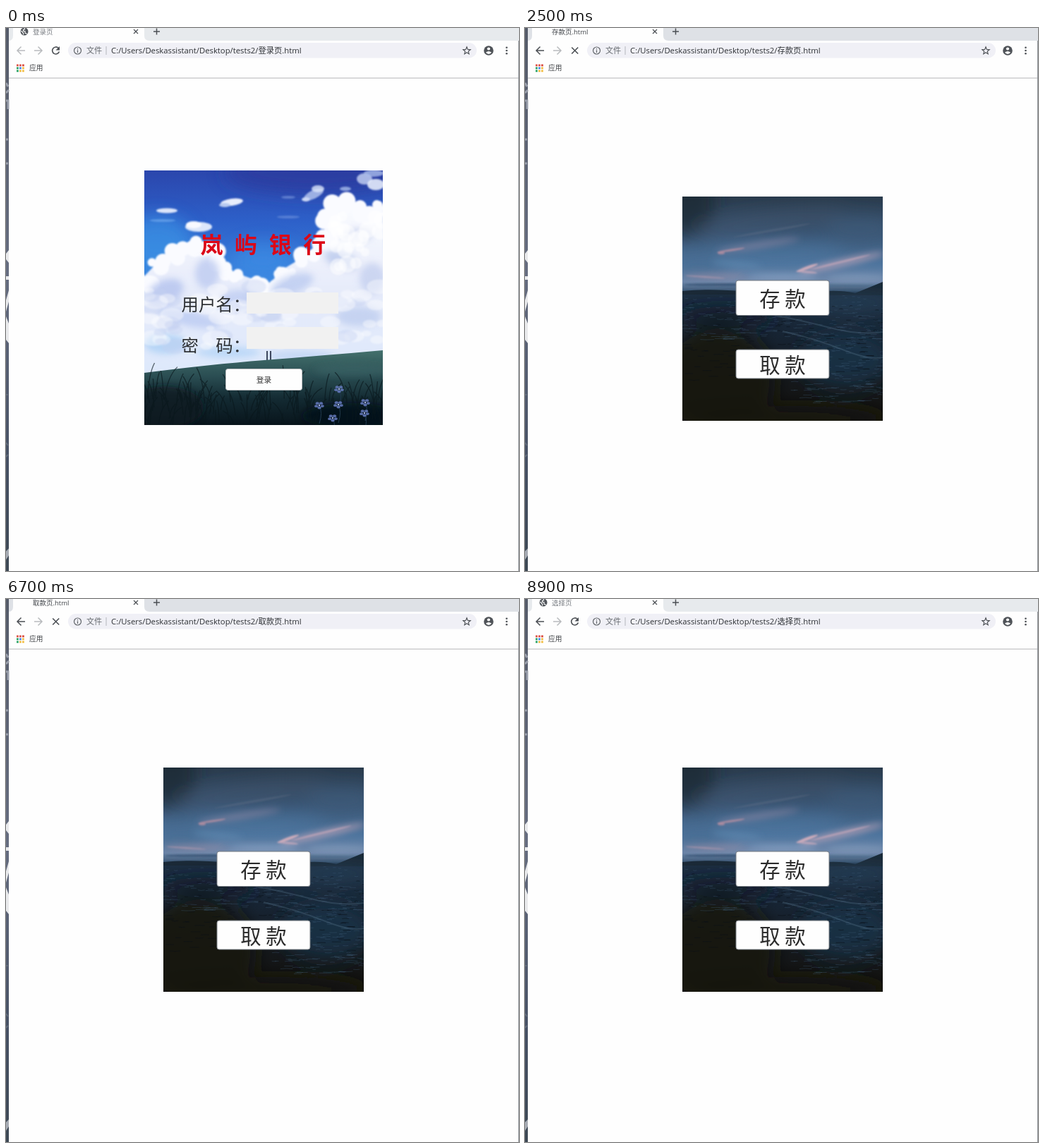
Write an HTML page that moves like this. It is 727x770 px and loops after 9 s.

```html
<!DOCTYPE html>
<html lang="zh-CN">
<head>
<meta charset="utf-8">
<title>Bank pages</title>
<style>
html, body { margin: 0; width: 100%; height: 100%; overflow: hidden; background: #fefefe; }
svg { display: block; }
text { font-family: "Open Sans", "Noto Sans CJK SC", "Noto Sans CJK", sans-serif; white-space: pre; }
.cjk { font-family: "Noto Sans CJK SC", "Noto Sans CJK", sans-serif; }
.page { visibility: hidden; }
</style>
</head>
<body>
<svg id="stage" width="727" height="770" viewBox="0 0 727 770">
  <defs>
    <linearGradient id="edge" x2="0" y2="1">
      <stop offset="0" stop-color="#555b69"/><stop offset=".45" stop-color="#666d80"/>
      <stop offset=".8" stop-color="#465063"/><stop offset="1" stop-color="#3d4854"/>
    </linearGradient>
    <linearGradient id="summer" x2="0" y2="1">
      <stop offset="0" stop-color="#2b46ac"/><stop offset=".2" stop-color="#2d60c9"/>
      <stop offset=".45" stop-color="#3d8ae2"/><stop offset="1" stop-color="#86b6ee"/>
    </linearGradient>
    <linearGradient id="cloud" x2="0" y2="1">
      <stop offset="0" stop-color="#fbfcff"/><stop offset=".5" stop-color="#e6ebfa"/>
      <stop offset="1" stop-color="#dde8fb"/>
    </linearGradient>
    <linearGradient id="hill" x2="0" y2="1">
      <stop offset="0" stop-color="#43706c"/><stop offset=".35" stop-color="#2a4d52"/>
      <stop offset=".65" stop-color="#132a32"/><stop offset="1" stop-color="#08141b"/>
    </linearGradient>
    <linearGradient id="dusk" x2="0" y2="1">
      <stop offset="0" stop-color="#2a3b4c"/><stop offset=".16" stop-color="#385473"/>
      <stop offset=".3" stop-color="#4d749d"/><stop offset=".38" stop-color="#7189ac"/>
      <stop offset=".42" stop-color="#3f5a78"/><stop offset=".435" stop-color="#1d3044"/>
      <stop offset=".6" stop-color="#182636"/><stop offset=".8" stop-color="#15191d"/>
      <stop offset="1" stop-color="#15130f"/>
    </linearGradient>
    <linearGradient id="sunset" x2="0" y2="1">
      <stop offset="0" stop-color="#171717"/><stop offset=".12" stop-color="#2b2524"/>
      <stop offset=".24" stop-color="#463936"/><stop offset=".34" stop-color="#76625a"/>
      <stop offset=".46" stop-color="#857f80"/><stop offset=".58" stop-color="#82838a"/>
      <stop offset=".69" stop-color="#68595a"/><stop offset=".72" stop-color="#3c3f49"/>
      <stop offset=".745" stop-color="#424651"/><stop offset=".75" stop-color="#363435"/>
      <stop offset=".85" stop-color="#211f20"/><stop offset="1" stop-color="#0b0a0a"/>
    </linearGradient>
    <linearGradient id="glow" x2="0" y2="1">
      <stop offset="0" stop-color="#8d5730"/><stop offset=".5" stop-color="#54341f"/>
      <stop offset="1" stop-color="#1c120d"/>
    </linearGradient>
    <filter id="soft1" x="-30%" y="-30%" width="160%" height="160%"><feGaussianBlur stdDeviation="1.3"/></filter>
    <filter id="soft5" x="-30%" y="-30%" width="160%" height="160%"><feGaussianBlur stdDeviation="5"/></filter>
    <filter id="soft12" x="-30%" y="-30%" width="160%" height="160%"><feGaussianBlur stdDeviation="12"/></filter>
  </defs>
</svg>
<script>
const LOOP = 9000;
const stage = document.getElementById('stage');
const defs = stage.querySelector('defs');

function add(parent, tag, attrs = {}, text) {
  const node = document.createElementNS('http://www.w3.org/2000/svg', tag);
  for (const key in attrs) node.setAttribute(key, attrs[key]);
  if (text !== undefined) node.textContent = text;
  parent.append(node);
  return node;
}
const group = (parent, attrs) => add(parent, 'g', attrs);
const rect = (parent, x, y, width, height, fill, more) =>
  add(parent, 'rect', { x, y, width, height, fill, ...more });
const path = (parent, d, more) => add(parent, 'path', { d, fill: 'none', ...more });
const label = (parent, x, y, size, fill, text, more) =>
  add(parent, 'text', { x, y, 'font-size': size, fill, ...more }, text);
const cjk = (parent, x, y, size, fill, text, more) =>
  label(parent, x, y, size, fill, text, { class: 'cjk', ...more });

function seeded(seed) {
  return () => (seed = (seed * 16807) % 2147483647) / 2147483647;
}

// A picture area whose contents are clipped to its frame.
function picture(parent, id, x, y, w, h, fill) {
  add(add(defs, 'clipPath', { id }), 'rect', { x, y, width: w, height: h });
  const g = group(parent, { 'clip-path': `url(#${id})` });
  rect(g, x, y, w, h, fill);
  return g;
}

// Each blob is [x, y, rx, ry, colour, opacity, tilt].
function blobs(parent, blur, list) {
  const g = group(parent, { filter: `url(#soft${blur})` });
  for (const [cx, cy, rx, ry, fill, opacity = 1, tilt = 0] of list)
    add(g, 'ellipse', { cx, cy, rx, ry, fill, opacity, transform: `rotate(${tilt} ${cx} ${cy})` });
}

// Short horizontal glints, wider and longer towards the viewer.
function ripples(parent, seed, count, [x, y, w, h], color, opacity) {
  const rnd = seeded(seed);
  let d = '';
  for (let i = 0; i < count; i++) {
    const depth = rnd(), len = 4 + depth * 16 * rnd();
    d += `M${(x + rnd() * w).toFixed(1)} ${(y + depth * h).toFixed(1)}q${(len / 2).toFixed(1)} ${(rnd() * 3 - 1.5).toFixed(1)} ${len.toFixed(1)} 0`;
  }
  path(parent, d, { stroke: color, 'stroke-width': 1, opacity });
}

function field(parent, x, y, w, h, fill = '#f1f1f1') { rect(parent, x, y, w, h, fill); }

function button(parent, x, y, w, h, size, base, text, fill = '#fefefe', stroke = '#b9bbbd') {
  rect(parent, x + .5, y + .5, w - 1, h - 1, fill, { rx: 3, stroke });
  cjk(parent, x + w / 2, base, size, '#2b2b2b', text, { 'text-anchor': 'middle' });
}

function meadow(parent) {
  const g = picture(parent, 'meadowClip', 196, 202, 338, 360.5, 'url(#summer)');
  const rnd = seeded(41);
  blobs(g, 12, [
    [440, 205, 130, 30, '#2a3c9f', .8], [215, 305, 50, 40, '#3f9bea', .6], [365, 330, 45, 25, '#3c8ce4', .7]
  ]);
  blobs(g, 1, [
    [320, 247, 16, 5, '#f3f6ff', .95, -8], [310, 251, 8, 3, '#b9cbf0'], [228, 259, 15, 3.5, '#eef3ff', .9],
    [273, 282, 19, 7, '#dce7fb'], [266, 279, 11, 5, '#f8faff'], [436, 236, 15, 6, '#b9caf0', .8, -25],
    [442, 228, 9, 5, '#dce6fa', .8], [425, 243, 6, 3, '#ccd8f5'], [508, 214, 11, 8, '#c8d5f5', .8],
    [524, 222, 12, 8, '#e4ebfb', .9], [521, 206, 14, 5, '#a9bceb', .8], [481, 228, 8, 3, '#a7bbea', .8],
    [400, 240, 10, 2, '#7f9be0', .6], [222, 273, 18, 2, '#6da5eb', .7], [400, 268, 16, 2, '#7b9ee3', .5]
  ]);

  const ridge = [[196, 352], [215, 332], [240, 314], [262, 301], [290, 307], [306, 326], [322, 346],
    [350, 356], [374, 361], [396, 340], [426, 322], [448, 296], [457, 264], [472, 247], [495, 250],
    [515, 260], [534, 252]];
  const body = group(g, { filter: 'url(#soft1)' });
  path(body, 'M190 500L' + ridge.join('L') + 'L540 500Z', { fill: 'url(#cloud)' });
  ridge.forEach(([x, y]) => {
    for (let i = 0; i < 5; i++)
      add(body, 'circle', { cx: x + rnd() * 24 - 12, cy: y + rnd() * 16 - 2, r: 5 + rnd() * 8, fill: '#fafbff' });
  });
  blobs(g, 5, [
    [225, 375, 28, 17, '#b4c4ee', .8, -25], [285, 348, 17, 22, '#bdcbf1', .8], [260, 412, 45, 11, '#b8c9f2', .75, 12],
    [330, 386, 27, 15, '#bac9f1', .7], [405, 364, 32, 13, '#b8c8ef', .75, -20], [497, 294, 22, 9, '#c0cbed', .8],
    [475, 329, 25, 12, '#bac8ed', .8, 20], [519, 355, 18, 22, '#c5d0ef', .8], [500, 409, 32, 14, '#bfceef', .8],
    [226, 448, 30, 14, '#acd0f5', .8], [315, 460, 45, 8, '#b4d5f7', .8], [417, 465, 48, 8, '#bdd2f3', .7]
  ]);
  const lumps = group(g, { filter: 'url(#soft1)' });
  for (let i = 0; i < 85; i++) {
    const x = 196 + rnd() * 338, y = 365 + rnd() * 88, r = 4 + rnd() * 10;
    add(lumps, 'ellipse', { cx: x, cy: y, rx: r * 1.35, ry: r * .8, fill: i % 3 ? '#fff' : '#c2cff1', opacity: .4 });
  }
  for (let i = 0; i < 24; i++)
    add(lumps, 'circle', { cx: 462 + rnd() * 72, cy: 258 + rnd() * 88, r: 5 + rnd() * 8, fill: '#fff', opacity: .55 });

  path(g, 'M370 458V471M375 458V471', { stroke: '#3d465d', 'stroke-width': 2 });
  path(g, 'M196 489Q290 477 366 471T534 457V563H196Z', { fill: 'url(#hill)' });
  blobs(g, 5, [[225, 538, 55, 30, '#0d1a21', .75], [490, 550, 70, 18, '#06141c', .8], [492, 485, 55, 8, '#3c666a', .5]]);
  let blades = '';
  for (let i = 0; i < 130; i++) {
    const x = 190 + rnd() * 350, y = 525 + rnd() * 45, lean = rnd() * 36 - 18, tall = 18 + rnd() * 35;
    blades += `M${x.toFixed(1)} ${y.toFixed(1)}q${(lean * .2).toFixed(1)} ${(-tall * .7).toFixed(1)} ${lean.toFixed(1)} ${(-tall).toFixed(1)}`;
  }
  path(g, blades, { stroke: '#0a171d', 'stroke-width': 1.3, opacity: .65 });
  [[472, 512], [471, 534], [444, 535], [509, 531], [508, 546], [463, 553]].forEach(([x, y]) => {
    path(g, `M${x} ${y}q5 10 0 26`, { stroke: '#223b50', 'stroke-width': 1 });
    for (let i = 0; i < 5; i++) {
      const a = i * Math.PI * .4 + .3;
      add(g, 'ellipse', { cx: x + Math.cos(a) * 4.5, cy: y + Math.sin(a) * 3.5, rx: 2.6, ry: 1.9, fill: '#667bc0', opacity: .85 });
    }
    add(g, 'circle', { cx: x, cy: y, r: 1.2, fill: '#a9b4df' });
  });
}

function coast(parent) {
  const g = picture(parent, 'coastClip', 223, 239, 284, 318, 'url(#dusk)');
  blobs(g, 12, [
    [225, 245, 45, 50, '#1d2932', .75], [345, 275, 110, 12, '#46596f', .5, -7], [360, 318, 95, 9, '#517da9', .6],
    [475, 285, 50, 16, '#405c7b', .7], [245, 340, 45, 12, '#42678b', .7]
  ]);
  blobs(g, 5, [
    [330, 308, 60, 4, '#8e87a3', .65, -9], [449, 333, 62, 5, '#bea5b9', .75, -13], [270, 352, 45, 3, '#a08da5', .7],
    [365, 353, 50, 4, '#8aa5c8', .7], [470, 355, 42, 5, '#849dbd', .7], [300, 335, 35, 4, '#6289b0', .7, 6]
  ]);
  blobs(g, 1, [
    [292, 315, 20, 1.6, '#b68fa2', .8, -9], [278, 319, 5, 2, '#bd91a3', .7], [400, 340, 16, 2.2, '#dab1bd', .85, -20],
    [447, 332, 44, 1.4, '#c9a8b9', .7, -14], [399, 346, 15, 1.6, '#cfadbc', .7, 5], [255, 353, 28, 1.2, '#b69aad', .6, 4],
    [290, 364, 65, 2, '#32516f', .7], [430, 366, 70, 2, '#546f8f', .7], [350, 287, 55, 1.5, '#657287', .4, -10]
  ]);
  path(g, 'M223 373Q265 369 315 374L315 378H223ZM398 377Q437 369 468 376L507 360V379H398Z', { fill: '#1b2a38' });
  blobs(g, 12, [
    [270, 500, 85, 75, '#16150f', .9], [455, 470, 65, 40, '#1d354b', .8], [285, 410, 70, 15, '#141d25', .8],
    [365, 554, 150, 18, '#15130f', .95], [462, 390, 65, 10, '#304b66', .6]
  ]);
  ripples(g, 9, 210, [220, 380, 287, 62], '#42617e', .32);
  ripples(g, 28, 170, [375, 420, 130, 112], '#466984', .3);
  ripples(g, 53, 140, [223, 390, 284, 110], '#0b1219', .55);
  path(g, 'M351 407Q390 414 432 425T507 431M365 430Q410 440 450 456T507 467', { stroke: '#536f87', opacity: .35, 'stroke-width': 2 });
}

function ocean(parent) {
  const g = picture(parent, 'oceanClip', 171, 114, 389, 569, 'url(#sunset)');
  blobs(g, 12, [
    [525, 145, 90, 80, '#101112', .7], [275, 205, 100, 25, '#493c3a', .6], [460, 230, 110, 18, '#332b2b', .7, 6],
    [330, 285, 135, 18, '#8b7163', .55], [515, 285, 60, 22, '#5c4b45', .7], [245, 340, 58, 17, '#546d9f', .85, 10],
    [210, 373, 58, 13, '#b9b5b1', .7, 18], [370, 380, 60, 30, '#b99677', .65], [185, 425, 45, 20, '#717b88', .7],
    [500, 430, 65, 23, '#6c8494', .7], [515, 385, 50, 14, '#beb1a2', .7, -12], [335, 454, 72, 36, '#b98156', .8],
    [455, 474, 55, 16, '#9a7863', .7], [225, 487, 65, 22, '#926a54', .8]
  ]);
  blobs(g, 5, [
    [218, 255, 48, 6, '#3a302f', .8, 8], [185, 283, 25, 5, '#403535', .8], [538, 325, 24, 9, '#40393a', .85, -15],
    [215, 380, 51, 5, '#e1d9cf', .8, 18], [278, 344, 35, 6, '#506bb0', .7, -12], [345, 360, 55, 7, '#67544c', .75],
    [421, 350, 60, 7, '#8a7060', .8, -8], [330, 416, 45, 12, '#dbac79', .75], [345, 451, 34, 17, '#d69f68', .8],
    [302, 466, 27, 16, '#d09461', .85], [393, 460, 25, 15, '#b77c50', .8], [210, 435, 35, 5, '#5e86b7', .8],
    [256, 402, 55, 6, '#716e72', .7, 14], [449, 422, 45, 7, '#766b67', .8], [484, 443, 50, 5, '#a78f7b', .7],
    [525, 401, 40, 5, '#d7c8b5', .7, -18], [514, 468, 48, 4, '#5c7789', .7], [365, 511, 220, 10, '#5a4b4b', .9],
    [365, 523, 220, 5, '#363943', .8]
  ]);
  const rnd = seeded(77), puffs = group(g, { filter: 'url(#soft1)' });
  for (let i = 0; i < 95; i++) {
    const x = 171 + rnd() * 389, near = Math.exp(-(((x - 335) / 80) ** 2));
    const y = 507 - rnd() * (25 + near * 58);
    add(puffs, 'ellipse', { cx: x, cy: y, rx: 5 + rnd() * 9, ry: 3 + rnd() * 6,
      fill: y < 489 ? (i % 3 ? '#cb925f' : '#805a49') : (i % 2 ? '#765a50' : '#514648'), opacity: .45 });
  }
  blobs(g, 1, [
    [201, 252, 25, 3, '#332b2b', .7, 6], [246, 261, 24, 3, '#3b3231', .7, 5], [536, 326, 19, 3, '#332f30', .8, -16],
    [523, 332, 11, 3, '#3c3534', .8], [215, 384, 48, 2, '#eae2d8', .7, 18], [205, 432, 25, 2, '#6b9bd0', .7, -5],
    [365, 517, 200, 3, '#454047', .7]
  ]);
  rect(g, 171, 538, 389, 1, '#5c5759', { opacity: .55 });
  const shine = group(g, { filter: 'url(#soft12)' });
  path(shine, 'M300 542H375L405 670H285Z', { fill: 'url(#glow)', opacity: .75 });
  ripples(g, 15, 430, [165, 542, 395, 140], '#040505', .38);
  ripples(g, 31, 160, [171, 542, 389, 130], '#706964', .18);
  ripples(g, 62, 110, [292, 542, 85, 110], '#b4733f', .3);
}

function dialog(parent, x, base, names, fields) {
  names.forEach((name, i) => cjk(parent, x, base + i * 65.4, 26.7, '#fefefe', name));
  fields.forEach(box => field(parent, ...box, '#f2f2f2'));
}

// Browser frame
rect(stage, 0, 0, 727, 770, '#fefefe');
const strip = rect(stage, 4, 0, 723, 18, '#dee1e6');
path(stage, 'M4 18Q10 18 10 11V0H196V11Q196 18 203 18Z', { fill: '#fefefe' });
rect(stage, 4, 70.5, 723, 1, '#b5b6b8');
rect(stage, 726, 18, 1, 752, '#8d9197');
rect(stage, 0, 0, 4, 770, 'url(#edge)');
path(stage, 'M0 78l3 5M0 92l4 -4M0 103h3v12M0 158h3M0 192h3', { stroke: '#9a9fab', 'stroke-width': 3 });
path(stage, 'M0 320L4 315V333L0 328ZM0 352H4V357H0ZM0 386L4 372V388L0 402ZM0 409L4 419V447L0 442Z', { fill: '#e9eaec' });
path(stage, 'M0 520h3M0 588l3 4M0 608l3 -3', { stroke: '#626b7a', 'stroke-width': 2 });
path(stage, 'M0 742L4 738V748L0 754Z', { fill: '#a6abb3' });

const INK = '#4b4f54';
const globe = group(stage);
add(globe, 'circle', { cx: 26, cy: 5, r: 5.5, fill: '#50545a' });
path(globe, 'M21.5 4L24.5 7V9.5M24 4.5H27V7.5H28.5L29.5 8.5M26.5 0V2H24.5V4', { stroke: '#fefefe', 'stroke-width': 1.1 });
const title = label(stage, 38, 8.7, 9.5, INK, '');
path(stage, 'M181 2L187 8M187 2L181 8', { stroke: INK, 'stroke-width': 1.2 });
path(stage, 'M209 5H218M213.5 .5V9.5', { stroke: INK, 'stroke-width': 1.5 });

const back = path(stage, 'M27 32H16.5M21.5 26.5L16 32L21.5 37.5', { 'stroke-width': 1.5 });
path(stage, 'M40 32H50.5M45.5 26.5L51 32L45.5 37.5', { stroke: '#b9bbbe', 'stroke-width': 1.5 });
const reload = group(stage);
path(reload, 'M74.3 28.5A5 5 0 1 0 75.4 33.5', { stroke: INK, 'stroke-width': 1.6 });
path(reload, 'M76 26V31.5H70.5Z', { fill: INK });
const stop = path(stage, 'M66.2 27.5L75.2 36.5M75.2 27.5L66.2 36.5', { stroke: INK, 'stroke-width': 1.6 });

rect(stage, 88, 21, 579, 21.5, '#f0f0f6', { rx: 10.7 });
add(stage, 'circle', { cx: 101.5, cy: 32, r: 5, fill: 'none', stroke: '#5f6368', 'stroke-width': 1.2 });
path(stage, 'M101.5 31.3V35M101.5 29V30.2', { stroke: '#5f6368', 'stroke-width': 1.2 });
label(stage, 114, 35.8, 11.1, '#666a6f', '文件');
rect(stage, 141.5, 26, 1, 12, '#b4b6bb');
const address = label(stage, 149, 35.8, 11.3, '#2d3034', '');
let star = '';
for (let i = 0; i < 10; i++) {
  const r = i % 2 ? 2.4 : 5.5, a = i * Math.PI / 5;
  star += `${i ? 'L' : 'M'}${653 + r * Math.sin(a)} ${32.3 - r * Math.cos(a)}`;
}
path(stage, star + 'Z', { stroke: INK, 'stroke-width': 1.1 });
add(stage, 'circle', { cx: 684, cy: 32, r: 6.8, fill: '#4f5358' });
add(stage, 'circle', { cx: 684, cy: 29.5, r: 2.1, fill: '#fefefe' });
path(stage, 'M679.9 34.8Q684 31.2 688.1 34.8Q684 39 679.9 34.8Z', { fill: '#fefefe' });
[27.7, 32, 36.3].forEach(cy => add(stage, 'circle', { cx: 709.5, cy, r: 1.3, fill: INK }));

['#de5246', '#de5246', '#d9493d', '#28a265', '#4386f5', '#f2bd42', '#28a265', '#f2bd42', '#f2bd42']
  .forEach((fill, i) => rect(stage, 15 + i % 3 * 4, 51.5 + Math.floor(i / 3) * 4, 2.8, 2.8, fill));
label(stage, 33, 60.4, 9.7, '#404347', '应用');

// Pages
const pages = {};
for (const key of ['login', 'choose', 'deposit', 'withdraw'])
  pages[key] = group(stage, { class: 'page' });

const { login, choose, deposit, withdraw } = pages;
meadow(login);
cjk(login, 275.5, 319, 32, '#dc0717', '岚屿银行', { 'font-weight': 700, 'letter-spacing': 16.6 });
cjk(login, 248.5, 400.8, 24.4, '#2d3033', '用户名：');
cjk(login, 248.5, 458.8, 24.4, '#2d3033', '密　码：');
field(login, 341, 375, 130, 30);
field(login, 341, 424, 130, 31);
button(login, 311, 483, 109, 31, 10.7, 502.5, '登录');

coast(choose);
button(choose, 298.5, 357.5, 133, 50.5, 29.4, 395, '存 款', '#fefefe', '#777c82');
button(choose, 298.5, 455.5, 133, 42, 29.4, 488.8, '取 款', '#fefefe', '#777c82');

ocean(deposit);
dialog(deposit, 205, 309, ['姓名：', '住址：', '存款类型：', '日期：', '利率：'],
  [[350, 280, 123, 35], [350, 343, 123, 35], [350, 399, 123, 40], [350, 452, 123, 40], [350, 518, 123, 40]]);
button(deposit, 288, 595.5, 108.5, 31, 19.4, 618.7, '确 认');

withdraw.append(deposit.firstChild.cloneNode(true));
withdraw.firstChild.setAttribute('transform', 'translate(0 -3)');
dialog(withdraw, 226, 334, ['姓名：', '日期：', '利息：'],
  [[320, 306, 131, 35], [320, 365, 131, 36], [320, 422, 131, 36]]);
button(withdraw, 296.5, 527.5, 108.5, 31, 19.4, 551, '确 认', '#e8f8ff');

const steps = [
  { at: 0, page: 'login', name: '登录页', idle: true },
  { at: 1400, page: 'login', name: '登录页' },
  { at: 1500, page: 'login', name: '选择页', loading: true },
  { at: 1600, page: 'choose', name: '选择页' },
  { at: 2500, page: 'choose', name: '存款页', loading: true },
  { at: 2600, page: 'deposit', name: '存款页' },
  { at: 5800, page: 'choose', name: '选择页' },
  { at: 6700, page: 'choose', name: '取款页', loading: true },
  { at: 6800, page: 'withdraw', name: '取款页' },
  { at: 7500, page: 'withdraw', name: '选择页', loading: true },
  { at: 7600, page: 'choose', name: '选择页' },
  { at: 8900, page: 'choose', name: '选择页', idle: true }
];
const show = (node, on) => { node.style.visibility = on ? 'visible' : 'hidden'; };
let current;

function render(time) {
  const t = time % LOOP;
  const step = steps.findLast(s => s.at <= t);
  if (step === current) return;
  current = step;
  for (const key in pages) show(pages[key], key === step.page);
  show(globe, !step.loading);
  show(reload, !step.loading);
  show(stop, step.loading);
  strip.setAttribute('fill', step.idle ? '#e7eaed' : '#dee1e6');
  title.setAttribute('fill', step.idle ? '#777b80' : '#3f4348');
  title.textContent = step.name + (step.loading ? '.html' : '');
  address.textContent = `C:/Users/Deskassistant/Desktop/tests2/${step.name}.html`;
  back.setAttribute('stroke', step.name === '登录页' ? '#b9bbbe' : INK);
}

const start = performance.now();
function tick() {
  render(performance.now() - start);
  requestAnimationFrame(tick);
}
tick();
</script>
</body>
</html>
```
